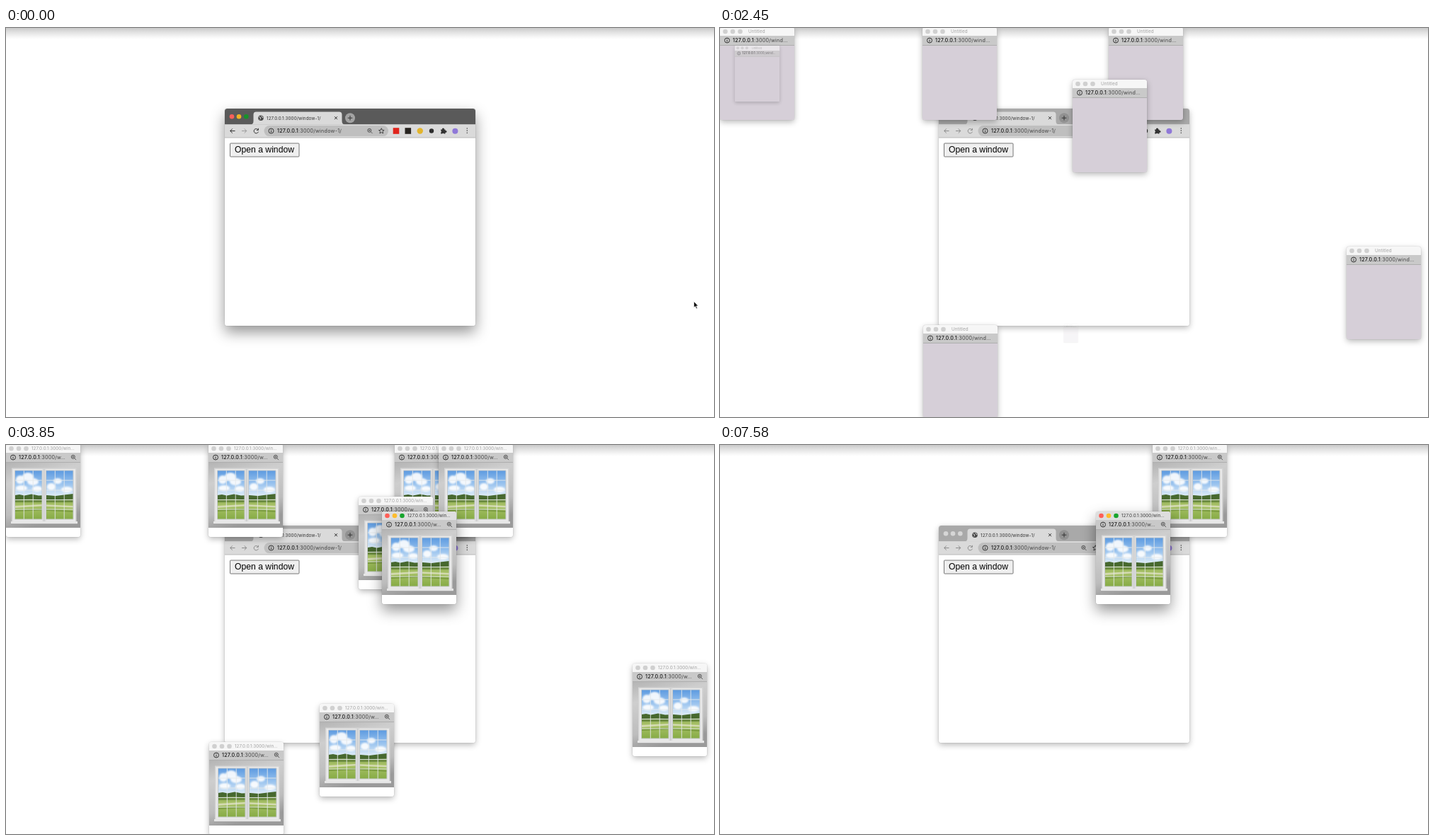
Animation, 1000 px wide and 550 px high, one loop 8000 ms. Source, as an HTML page:

```html
<!DOCTYPE html>
<html lang="en">
<head>
<meta charset="utf-8">
<title>Opening windows</title>
<style>
html, body { margin: 0; width: 100%; height: 100%; overflow: hidden; background: #fff; }
#stage { position: relative; width: 1000px; height: 550px; overflow: hidden; background: #fff; }
#stage > * { position: absolute; }
#topShade { left: 0; top: 0; width: 1000px; height: 16px;
  background: linear-gradient(#c9c9c9, #e0e0e0 35%, #f5f5f5 75%, #fff); }
svg { display: block; font-family: Inter, Roboto, sans-serif; }
.win { border-radius: 3.5px; box-shadow: 0 0 1px rgba(0,0,0,.45), 0 3px 9px rgba(0,0,0,.28); }
.win svg { border-radius: 3.5px; overflow: hidden; }
.win.active { box-shadow: 0 0 1px rgba(0,0,0,.5), 0 9px 20px rgba(0,0,0,.42); }
#main { left: 309px; top: 113.5px; width: 353.5px; height: 307px; }
.popup { width: 105px; height: 131px; }

.light { fill: #d0d0d0; }
.active .light.r { fill: #ff5f57; }
.active .light.y { fill: #febc2e; }
.active .light.g { fill: #18a52e; }
#main .light { fill: #d6d6d6; }
#main.active .light.r { fill: #f9605a; }
#main.active .light.y { fill: #f0b323; }
#main.active .light.g { fill: #17922a; }
.frame { fill: #a9a9a9; }
.active .frame { fill: #5a5a5a; }
.plus { fill: #929292; }
.active .plus { fill: #a3a3a3; }
.nav { stroke: #8c8c8c; }
.active .nav { stroke: #333; }
.active .nav.off { stroke: #9b9b9b; }
.line { fill: none; stroke-width: 1; }
.dark { stroke: #444; }
.title { font-size: 6.3px; fill: #a2a2a2; letter-spacing: .06px; }
.active .title { fill: #3c3c3c; }
.bar { fill: #f6f6f6; }
.active .bar { fill: #dedede; }
.url { font-size: 7.2px; fill: #424242; letter-spacing: .22px; }
.host { fill: #161616; font-weight: 500; }
.button rect { fill: #efefef; stroke: #767676; }
.button.hover rect { fill: #e5e5e5; stroke: #4f4f4f; }
.button.down rect { fill: #f5f5f5; stroke: #8d8d8d; }
.button text { font: 12.2px "Liberation Sans", Arial, sans-serif; }
</style>
</head>
<body>
<div id="stage">
  <div id="topShade"></div>

  <svg width="0" height="0">
    <defs>
      <linearGradient id="wall" x2=".3" y2="1">
        <stop stop-color="#b4b4b4"/><stop offset=".3" stop-color="#cecece"/>
        <stop offset=".75" stop-color="#bdbdbd"/><stop offset="1" stop-color="#9a9a9a"/>
      </linearGradient>
      <linearGradient id="sky" x2="0" y2="1">
        <stop stop-color="#5c9ae0"/><stop offset=".5" stop-color="#98c2ee"/><stop offset="1" stop-color="#e2eef8"/>
      </linearGradient>
      <linearGradient id="grass" x2="0" y2="1">
        <stop stop-color="#7a9c45"/><stop offset=".4" stop-color="#a9c268"/><stop offset="1" stop-color="#86ab45"/>
      </linearGradient>
      <filter id="soft"><feGaussianBlur stdDeviation="1"/></filter>
      <symbol id="info" viewBox="-5 -5 10 10">
        <circle r="3.5" class="line" stroke="#333" stroke-width=".9"/>
        <path d="M0-.5V2M0-2.1V-1.2" stroke="#333"/>
      </symbol>
      <symbol id="zoom" viewBox="-5 -5 10 10">
        <g class="line" stroke="#444">
          <circle cx="-.7" cy="-.7" r="2.5" stroke-width=".9"/>
          <path d="M1.2 1.2L3.6 3.6M-1.8-.7H.4M-.7-1.8V.4" stroke-width=".8"/>
        </g>
      </symbol>
      <symbol id="photo" viewBox="0 0 105 92">
        <rect width="105" height="92" fill="url(#wall)"/>
        <path d="M8 7.5H99.5V86H8Z" fill="#d4d4d4"/>
        <path d="M9.5 9H98V83H9.5Z" fill="#e9e9e9"/>
        <path d="M7 83H101V86.5H7Z" fill="#e6e6e6"/>
        <path d="M7 86.5H101V87.5H7Z" fill="#9a9a9a"/>
        <rect x="12.5" y="11" width="82.5" height="37" fill="url(#sky)"/>
        <g fill="#fff" opacity=".9" filter="url(#soft)">
          <ellipse cx="20" cy="24" rx="6" ry="6"/><ellipse cx="31" cy="20" rx="8" ry="6"/>
          <ellipse cx="38" cy="27" rx="8" ry="5"/><ellipse cx="22" cy="36" rx="8" ry="4"/>
          <ellipse cx="44" cy="37" rx="7" ry="4"/><ellipse cx="64" cy="34" rx="6" ry="5"/>
          <ellipse cx="73" cy="26" rx="6" ry="4"/><ellipse cx="86" cy="38" rx="8" ry="4"/>
        </g>
        <rect x="12.5" y="47" width="82.5" height="33" fill="url(#grass)"/>
        <path d="M12.5 46L19 45L26 46.5L36 44.5L46 46.5L58 46L70 47L82 45.5L95 44V54L72 53L45 55L12.5 54Z" fill="#47682f"/>
        <path d="M12.5 52L34 51L60 53L95 51V56H12.5Z" fill="#6d8c42"/>
        <path d="M12.5 61L50 59L95 61V63.5L50 61.5L12.5 64Z" fill="#d3dab0"/>
        <path d="M12.5 67L48 65L95 68V70L50 67.5L12.5 69Z" fill="#7b9c40"/>
        <path d="M25.3 11V80M38.2 11V80M69.3 11V80M82.2 11V80M12.5 25H95M12.5 39H95M12.5 52.5H95M12.5 66H95"
          stroke="#e4e8ea" stroke-width=".9"/>
        <path d="M51 9H56.5V83H51Z" fill="#dedede"/>
        <path d="M53.8 9V83" stroke="#bcbfc1" stroke-width=".8"/>
        <path d="M12.5 80V11H51V80ZM56.5 80V11H95V80Z" class="line" stroke="#c6cacc" stroke-width=".7"/>
      </symbol>
    </defs>
  </svg>

  <div id="main" class="win active">
    <svg width="353.5" height="307" viewBox="309 113.5 353.5 307">
      <rect x="309" y="113" width="354" height="308" fill="#fff"/>
      <rect class="frame" x="309" y="113" width="354" height="23"/>
      <circle class="light r" cx="319" cy="124.7" r="3.3"/>
      <circle class="light y" cx="329" cy="124.7" r="3.3"/>
      <circle class="light g" cx="339.3" cy="124.7" r="3.3"/>
      <path d="M345 136Q349.5 136 349.5 131V122Q349.5 118 353.5 118H470.5Q474.5 118 474.5 122V131Q474.5 136 479 136Z" fill="#dadada"/>
      <circle cx="360" cy="126.7" r="3.8" fill="#484848"/>
      <path d="M357.4 125.2Q360 125 359.6 127.6L358.6 129M361 123.6Q361 126 363.3 126.4" class="line" stroke="#d8d8d8" stroke-width="1.1"/>
      <text x="368" y="129" font-size="6.3" letter-spacing=".08" fill="#333">127.0.0.1:3000/window-1/</text>
      <path d="M464 124.7L468 128.7M468 124.7L464 128.7" class="line" stroke="#333"/>
      <circle class="plus" cx="486" cy="126.7" r="7"/>
      <path d="M486 123.4V130M482.7 126.7H489.3" class="line" stroke="#333" stroke-width="1.1"/>

      <rect x="309" y="136" width="354" height="18.5" fill="#dadada"/>
      <rect x="309" y="154" width="354" height="1" fill="#b9b9b9"/>
      <path class="line nav" d="M323.5 145H316.8M319.8 141.9L316.7 145L319.8 148.1"/>
      <path class="line nav off" d="M333 145H339.7M336.7 141.9L339.8 145L336.7 148.1"/>
      <path class="line nav" d="M355.9 143.2A3.2 3.2 0 1 0 356.4 146.2M356.4 141.3V143.9H353.8"/>
      <rect x="364.5" y="137.6" width="175.5" height="15" rx="7.5" fill="#bfbfbf"/>
      <use href="#info" x="369.5" y="140" width="10" height="10"/>
      <text class="url" x="383" y="147.7"><tspan class="host">127.0.0.1</tspan>:3000/window-1/</text>
      <use href="#zoom" x="509" y="140" width="10" height="10"/>
      <path class="line dark" stroke-width=".9"
        d="M530.3 141.2L531.4 143.8L534.1 144L532 145.8L532.7 148.5L530.3 147L527.9 148.5L528.6 145.8L526.5 144L529.2 143.8Z"/>
      <rect x="546.7" y="140.7" width="8.6" height="8.6" fill="#e0241c"/>
      <rect x="563.5" y="140.7" width="8.6" height="8.6" fill="#282420"/>
      <circle cx="584.8" cy="145" r="4.2" fill="#e3b52c"/>
      <circle cx="601" cy="145" r="3.2" fill="#2d2d2d"/>
      <path d="M614.2 143H616.2A1.4 1.4 0 1 1 618.8 143H620.5V144.7A1.4 1.4 0 1 1 620.5 147.2V149H618.5A1.2 1.2 0 0 0 616.2 149H614.2V147A1.2 1.2 0 0 0 614.2 144.8Z" fill="#333"/>
      <circle cx="634.4" cy="145.2" r="4" fill="#8f78d8"/>
      <path d="M651.3 141.5V149" stroke="#444" stroke-width="1.6" stroke-linecap="round" stroke-dasharray="0 3.1"/>

      <g id="button" class="button">
        <rect x="316.5" y="162.5" width="97.5" height="19" rx="1"/>
        <text x="323" y="175.4">Open a window</text>
      </g>
    </svg>
  </div>

  <svg id="cursor" width="9" height="14" viewBox="-1 -1 9 14" style="z-index:20">
    <path d="M0 0V8.8L2 7L3.5 10.4L5 9.7L3.5 6.5H6.2Z" fill="#111" stroke="#fff" stroke-width=".7"/>
  </svg>
</div>

<script>
const LOOP = 8000, STEP = 70;
const stage = document.getElementById('stage');
const main = document.getElementById('main');
const button = document.getElementById('button');
const cursor = document.getElementById('cursor');

// In opening order: left, top, closing time and, if it jumps once open, its first left.
const spots = [
  [286.5, 419.5, 4850], [286, -1, 6950], [549, -1, 7020], [498, 73, 7090], [885, 309, 7160],
  [0, -1, 7230], [611, -1, LOOP, 0], [442.5, 366, 7300], [531, 94, LOOP]
];
const LAST = spots.length - 1, SLOW = 7;

const popups = spots.map(([x, y, close, startX = x], i) => {
  const el = document.createElement('div');
  el.className = 'win popup';
  el.style.top = y + 'px';
  el.innerHTML = `<svg width="105" height="131">
    <rect data-part="page" width="105" height="131"/>
    <rect class="bar" width="105" height="12.5"/>
    <circle class="light r" cx="7.5" cy="6" r="3.3"/>
    <circle class="light y" cx="18" cy="6" r="3.3"/>
    <circle class="light g" cx="28.5" cy="6" r="3.3"/>
    <text data-part="title" class="title" y="8.3"></text>
    <rect y="12" width="105" height="14" fill="#c9c9c9"/>
    <rect y="25" width="105" height="1" fill="#aeaeae"/>
    <use href="#info" x="5" y="13.5" width="10" height="10"/>
    <text class="url" x="18" y="21.1"><tspan class="host">127.0.0.1</tspan><tspan data-part="path"></tspan></text>
    <use data-part="zoom" href="#zoom" x="90.5" y="13.5" width="10" height="10"/>
    <use data-part="photo" href="#photo" y="26" width="105" height="92"/>
    <g data-part="status">
      <path d="M0 120H32Q34 120 34 122V131H0Z" fill="#565656"/>
      <text x="3" y="127.8" font-size="6.1" fill="#fff">Proces…</text>
    </g></svg>`;
  stage.append(el);
  const parts = {};
  el.querySelectorAll('[data-part]').forEach(p => parts[p.dataset.part] = p);
  return {
    el, parts, x, startX, close,
    open: 1740 + 95 * i,
    zoom: 2600 + 40 * i,
    status: 2760 + 50 * i,
    title: i === SLOW ? 3220 : 2800 + 35 * i,
    photo: i ? 3360 + 40 * i : 3080
  };
});

// Time, x, y of the pointer tip.
const path = [
  [0, 971.5, 386.5], [70, 850, 270], [140, 715, 185], [210, 632, 147],
  [420, 700, 338], [490, 560, 215], [560, 430, 152], [630, 338, 129],
  [770, 348, 140], [840, 400, 188], [910, 446, 225], [980, 438, 252], [1050, 402, 244],
  [1120, 375, 215], [1190, 360, 190], [1260, 365, 176], [1330, 370, 171]
];

const clamp = v => Math.max(0, Math.min(1, v));
const show = (el, on) => { el.style.display = on ? '' : 'none'; };

function drawCursor(t) {
  const [, x, y] = path.filter(p => p[0] <= t).pop();
  cursor.style.transform = `translate(${x - 1}px, ${y - 1}px)`;
  show(cursor, t < 1750);
  const over = x > 316 && x < 414 && y > 162 && y < 182 && t < 1750;
  button.classList.toggle('hover', over && t < 1680);
  button.classList.toggle('down', over && t >= 1680);
}

function drawPopup(w, i, t) {
  const grow = clamp((t - w.open) / 230);
  const fade = clamp((t - w.close) / 200);
  show(w.el, grow > 0 && fade < 1);
  w.el.style.left = (grow < 1 ? w.startX : w.x) + 'px';
  w.el.style.transform = `scale(${grow * (1 - .25 * fade)})`;
  w.el.style.opacity = grow * (1 - fade);
  w.el.classList.toggle('active', i === LAST && grow === 1);

  const { page, title, path, zoom, photo, status } = w.parts;
  const loaded = t >= w.photo, named = t >= w.title, zoomed = t >= w.zoom;
  page.setAttribute('fill', loaded ? '#fff' : '#d6cfd8');
  title.setAttribute('x', named ? 36 : 40);
  title.textContent = named ? '127.0.0.1:3000/win…' : 'Untitled';
  path.textContent = zoomed ? ':3000/w…' : ':3000/wind…';
  show(zoom, zoomed);
  show(photo, loaded);
  show(status, t >= w.status && t < w.photo + 140);
}

function render() {
  const t = Math.floor(performance.now() % LOOP / STEP) * STEP;
  main.classList.toggle('active', t < 1750);
  drawCursor(t);
  popups.forEach((w, i) => drawPopup(w, i, t));
  requestAnimationFrame(render);
}
render();
</script>
</body>
</html>
```
